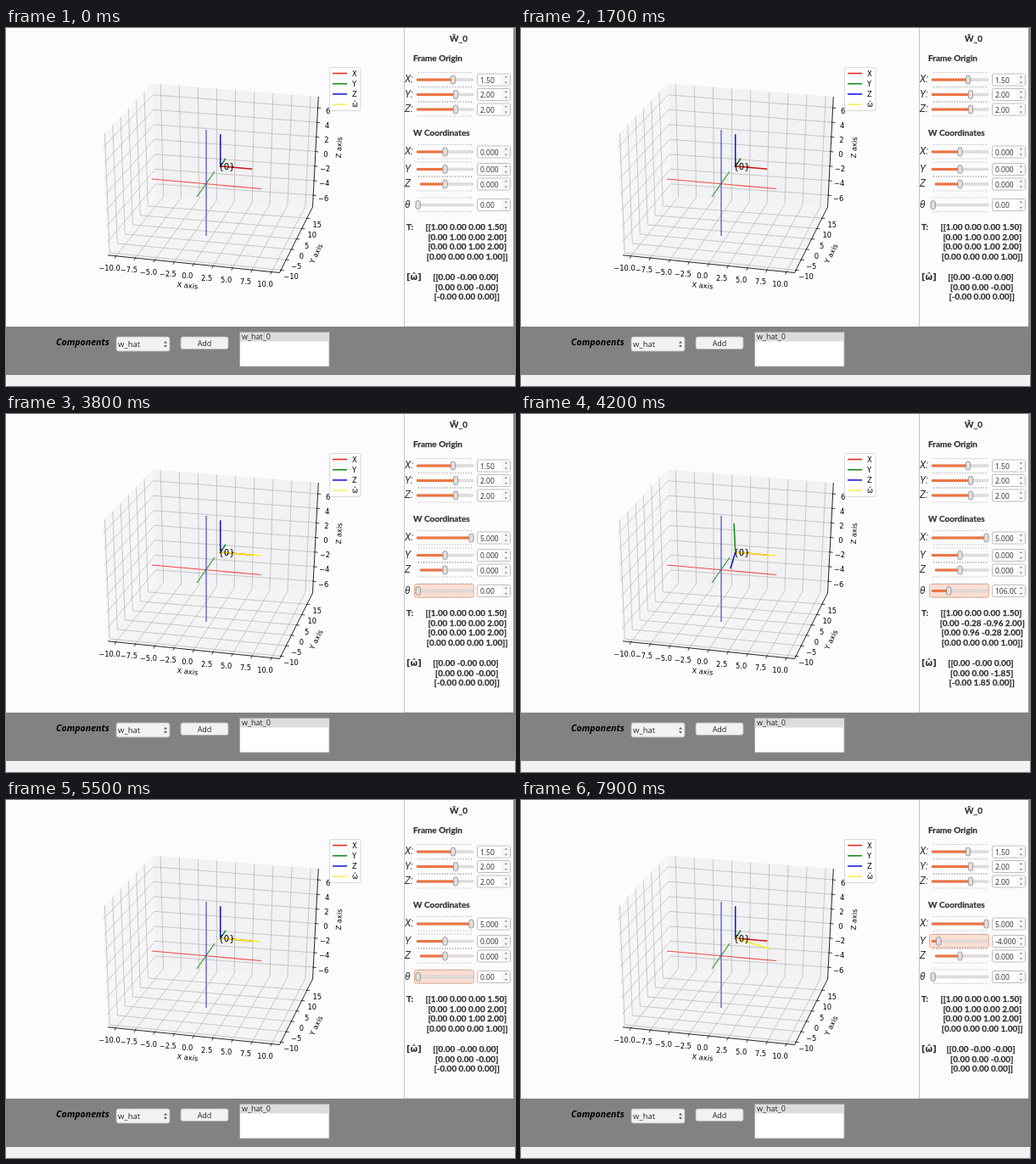
These frames come from a looping animation (600x422 px, 8000 ms). An HTML page:

```html
<!DOCTYPE html>
<html lang="en">
<head>
<meta charset="utf-8">
<title>Rotation axis viewer</title>
<style>
html, body { margin: 0; width: 100%; height: 100%; overflow: hidden; background: #fdfcfd; }
svg { display: block; width: 100vw; height: 100vh; }
text { white-space: pre; fill: #222; }
.plot { font: 8.3px "DejaVu Sans", sans-serif; fill: #000; }
.bold { font: bold 10px Lato, sans-serif; fill: #333; stroke: #333; stroke-width: 0.25px; }
.name { font: italic 12px Roboto, sans-serif; fill: #333; }
.ui { font: 9px "Open Sans", sans-serif; fill: #262626; }
.value { font-size: 8.5px; }
</style>
</head>
<body>
<svg id="stage" viewBox="0 0 600 422" preserveAspectRatio="none"></svg>
<script>
const stage = document.getElementById('stage');

function add(tag, attrs, content = '') {
  const el = document.createElementNS('http://www.w3.org/2000/svg', tag);
  for (const key in attrs) el.setAttribute(key, attrs[key]);
  el.textContent = content;
  return stage.appendChild(el);
}
const rect = (x, y, width, height, fill, extra) => add('rect', { x, y, width, height, fill, ...extra });
const line = ([x1, y1], [x2, y2], stroke, width = 1, extra) =>
  add('line', { x1, y1, x2, y2, stroke, 'stroke-width': width, ...extra });
const text = (content, x, y, cls, anchor = 'start', extra) =>
  add('text', { x, y, class: cls, 'text-anchor': anchor, ...extra }, content);
const lerp = (a, b, f) => a + (b - a) * f;
const mix = (p, q, f) => [lerp(p[0], q[0], f), lerp(p[1], q[1], f)];

// Window background
rect(0, 0, 600, 422, '#fdfcfd');
rect(469.5, -1, 129, 353, '#fdfcfd', { stroke: '#c4c3c5' });
rect(598, 0, 2, 352, '#8c8c8c');
rect(0, 352, 600, 57, '#828282');
rect(0, 409, 600, 13, '#f2f0f2');

// Plot box: floor corners, then upper corners of the two walls
const left = [120, 267.8], front = [322.5, 288.5], right = [361.5, 211], back = [177, 198];
const leftTop = [114, 126.5], rightTop = [368.3, 81], backTop = [173, 65.5];
const pane = (fill, ...points) => add('polygon', { points: points.join(' '), fill });
pane('#f7f6f7', left, leftTop, backTop, back);
pane('#f2f1f3', back, backTop, rightTop, right);
pane('#f5f4f5', left, front, right, back);

const grid = (p, q) => line(p, q, '#b4b4b4', 0.7);
const tick = ([x, y], dx, dy) => line([x - dx * 0.3, y - dy * 0.3], [x + dx, y + dy], '#111', 0.8);
const label = (value, [x, y], decimals = 0) =>
  text(value.toFixed(decimals).replace('-', '\u2212'), x, y + 3, 'plot', 'middle');

for (let i = 0; i <= 8; i++) {
  const f = lerp(0.047, 0.953, i / 8), p = mix(left, front, f), q = mix(back, right, f);
  grid(p, q);
  grid(q, mix(backTop, rightTop, f));
  tick(p, -1.5, 3);
  label(-10 + 2.5 * i, [p[0] - 7.5, p[1] + 14.3], 1);
}
for (let i = 0; i <= 5; i++) {
  const f = lerp(0.04, 0.83, i / 5), p = mix(front, right, f), q = mix(left, back, f);
  grid(p, q);
  grid(q, mix(leftTop, backTop, f));
  tick(p, 3.5, 0.4);
  label(-10 + 5 * i, [p[0] + 12, p[1] + 8]);
}
for (let i = 0; i <= 6; i++) {
  const f = lerp(0.107, 0.9, i / 6), p = mix(right, rightTop, f), q = mix(back, backTop, f);
  grid(p, q);
  grid(q, mix(left, leftTop, f));
  tick(p, 3.5, 0.5);
  label(-6 + 2 * i, [p[0] + 12, p[1] + 3.5]);
}
line(left, front, '#111', 0.9);
line(front, right, '#111', 0.9);
line(right, rightTop, '#111', 0.9);

const axisTitle = (content, x, y, angle) =>
  text(content, 0, 3, 'plot', 'middle', { transform: `translate(${x} ${y}) rotate(${angle})` });
axisTitle('X axis', 214, 303.5, 6);
axisTitle('Y axis', 365.5, 266, -64);
axisTitle('Z axis', 392.5, 141, -87);

const RED = '#e8281e', GREEN = '#128a12', BLUE = '#1a1ae6', YELLOW = '#f5f01c';
line([172, 178], [301, 189.5], '#f04a42', 1.2);
line([225, 199], [246, 169], '#2f9a2f', 1.2);
line([236, 120], [236, 245], '#4a4ac8', 1.2);

// Moving frame
const origin = [252.7, 163];
const project = (x, y, z) => [
  origin[0] + 9.2 * x + 1.45 * y,
  origin[1] + 0.8 * x - 2.15 * y - 9.25 * z
];
const arm = (color, tip) => line(origin, tip, color, 1.5, { 'stroke-linecap': 'square' });
function aim(el, [x, y]) {
  el.setAttribute('x2', x);
  el.setAttribute('y2', y);
}
arm('#d01010', project(4, 0, 0));
const armY = arm(GREEN, project(0, 4, 0));
const armZ = arm('#1010c8', project(0, 0, 4));
const omega = arm(YELLOW, origin);
text('{0}', 260, 167.3, 'plot', 'middle', { style: 'font-size:10px' });

// Legend
rect(381.5, 46.5, 36.5, 51, '#fff', { rx: 2, stroke: '#d0d0d0', 'stroke-width': 0.8 });
[['X', RED], ['Y', GREEN], ['Z', BLUE], ['\u03c9\u0302', '#f5f05a']].forEach(([name, color], i) => {
  const y = 53.5 + 12.2 * i;
  line([385, y], [402, y], color, 1.6);
  text(name, 408, y + 3, 'plot');
});

// Side panel
text('\u0174_0', 533.5, 15.5, 'bold', 'middle');
text('Frame Origin', 480, 38.5, 'bold');
text('W Coordinates', 480, 126.5, 'bold');
text('T:', 472, 238, 'bold');
text('[\u03c9\u0302]', 472, 297, 'bold', 'start', { style: 'font-family:"DejaVu Sans",sans-serif;stroke:none' });

function control(name, y, labelX, railX = 484) {
  text(name, labelX, y + 3, 'name');
  const glow = rect(481.5, y - 8, 70, 15.5, '#fadfd5', { rx: 2, stroke: '#e8a58c', 'stroke-width': 0.9 });
  for (const dy of [-8.5, 8]) {
    line([486, y + dy], [550, y + dy], '#a8a6a6', 1, { 'stroke-dasharray': '1 2.1' });
  }
  rect(railX, y - 1.2, 551 - railX, 2.4, '#e6e3e1', { rx: 1, stroke: '#bbb6b2', 'stroke-width': 0.5 });
  const fill = rect(railX, y - 1.5, 1, 3, '#ee7442', { rx: 1 });
  const knob = rect(0, y - 5, 5.4, 10, '#e2dfdd', { rx: 2.5, stroke: '#8a8683', 'stroke-width': 0.8 });

  rect(555.5, y - 7, 39, 14, '#fff', { rx: 2, stroke: '#b9b5b2', 'stroke-width': 0.9 });
  const value = text('', 559, y + 3.5, 'ui value');
  rect(584, y - 6.4, 10, 12.8, '#f7f6f5');
  add('path', { d: `M587.7 ${y - 2.5}h3.4l-1.7-2zM587.7 ${y + 2.5}h3.4l-1.7 2z`, fill: '#888' });

  return (content, x, active = false) => {
    value.textContent = content;
    fill.setAttribute('width', Math.max(0, x - railX));
    knob.setAttribute('x', x - 2.7);
    glow.setAttribute('visibility', active ? 'visible' : 'hidden');
  };
}
control('X:', 61, 470)('1.50', 527);
control('Y:', 78.5, 470)('2.00', 530);
control('Z:', 96, 470)('2.00', 530);
const setX = control('X:', 146, 470);
const setY = control('Y', 166.5, 470);
control('Z', 184, 470, 488)('0.000', 517.5);
const setTheta = control('\u03b8', 208.5, 470);

const rows = (count, x, y) => Array.from({ length: count }, (_, i) => text('', x, y + 11.7 * i, 'bold', 'middle'));
const poseRows = rows(4, 542.5, 238);
const skewRows = rows(3, 542, 297);
const signed = v => (Object.is(v, -0) ? '-' : '') + v.toFixed(2);
function showMatrix(lines, matrix, format) {
  matrix.forEach((row, i) => {
    const open = i ? '\u00a0[' : '[[', close = i === matrix.length - 1 ? ']]' : ']';
    lines[i].textContent = open + row.map(format).join(' ') + close;
  });
}

// Bottom bar
text('Components', 59, 374, 'ui', 'start', { style: 'font:italic bold 10.6px "Open Sans",sans-serif;fill:#000' });
const button = (x, y, w, h) => rect(x, y, w, h, '#f3f2f1', { rx: 2.5, stroke: '#b5b1ae', 'stroke-width': 0.8 });
button(130, 364, 63, 17);
text('w_hat', 132, 376, 'ui', 'start', { style: 'font-size:9.5px' });
add('path', { d: 'M186 371.5h4l-2-2.4zM186 374h4l-2 2.4z', fill: '#555' });
button(206, 364, 56, 14.5);
text('Add', 234, 374.8, 'ui', 'middle');
rect(275.5, 358.5, 105.5, 40.5, '#fff', { stroke: '#a5a3a1', 'stroke-width': 0.8 });
rect(276, 359, 104.5, 10.5, '#dddcda');
text('w_hat_0', 278, 367.2, 'ui');

// Slider tracks as [time, value] steps
const tracks = {
  x: [[2000, 0], [2650, 5]],
  y: [[7000, 0], [7750, -4]],
  theta: [[3850, 0], [4700, 258], [4950, 360], [5420, 0], [5580, 0], [5950, 360], [6330, 0]]
};
function valueAt(track, t) {
  const next = track.findIndex(([time]) => time > t);
  if (next === 0) return track[0][1];
  if (next < 0) return track[track.length - 1][1];
  const [t0, v0] = track[next - 1], [t1, v1] = track[next];
  return Math.round(lerp(v0, v1, (t - t0) / (t1 - t0)));
}
const within = (t, from, to) => t >= from && t < to;

function render(t) {
  const x = valueAt(tracks.x, t), y = valueAt(tracks.y, t), theta = valueAt(tracks.theta, t);
  const angle = theta * Math.PI / 180, c = Math.cos(angle), s = Math.sin(angle);

  setX(x.toFixed(3), 517.5 + 6.2 * x, within(t, 1900, 2900));
  setY((y || 0).toFixed(3), 517.5 + 6.3 * y, t >= 6900);
  setTheta(theta.toFixed(2), 485.7 + 63 * theta / 360, within(t, 3200, 6900));

  aim(armY, project(0, 4 * c, 4 * s));
  aim(armZ, project(0, -4 * s, 4 * c));
  aim(omega, project(x, y, 0));
  omega.setAttribute('visibility', x || y ? 'visible' : 'hidden');

  showMatrix(poseRows, [[1, 0, 0, 1.5], [0, c, -s, 2], [0, s, c, 2], [0, 0, 0, 1]], v => v.toFixed(2));
  const wy = y < 0 ? -0 : 0;
  showMatrix(skewRows, [[0, -0, wy], [0, 0, -angle], [-wy, angle, 0]], signed);
}

function loop() {
  render(Math.floor(performance.now() % 8000 / 100) * 100);
  requestAnimationFrame(loop);
}
loop();
</script>
</body>
</html>
```
